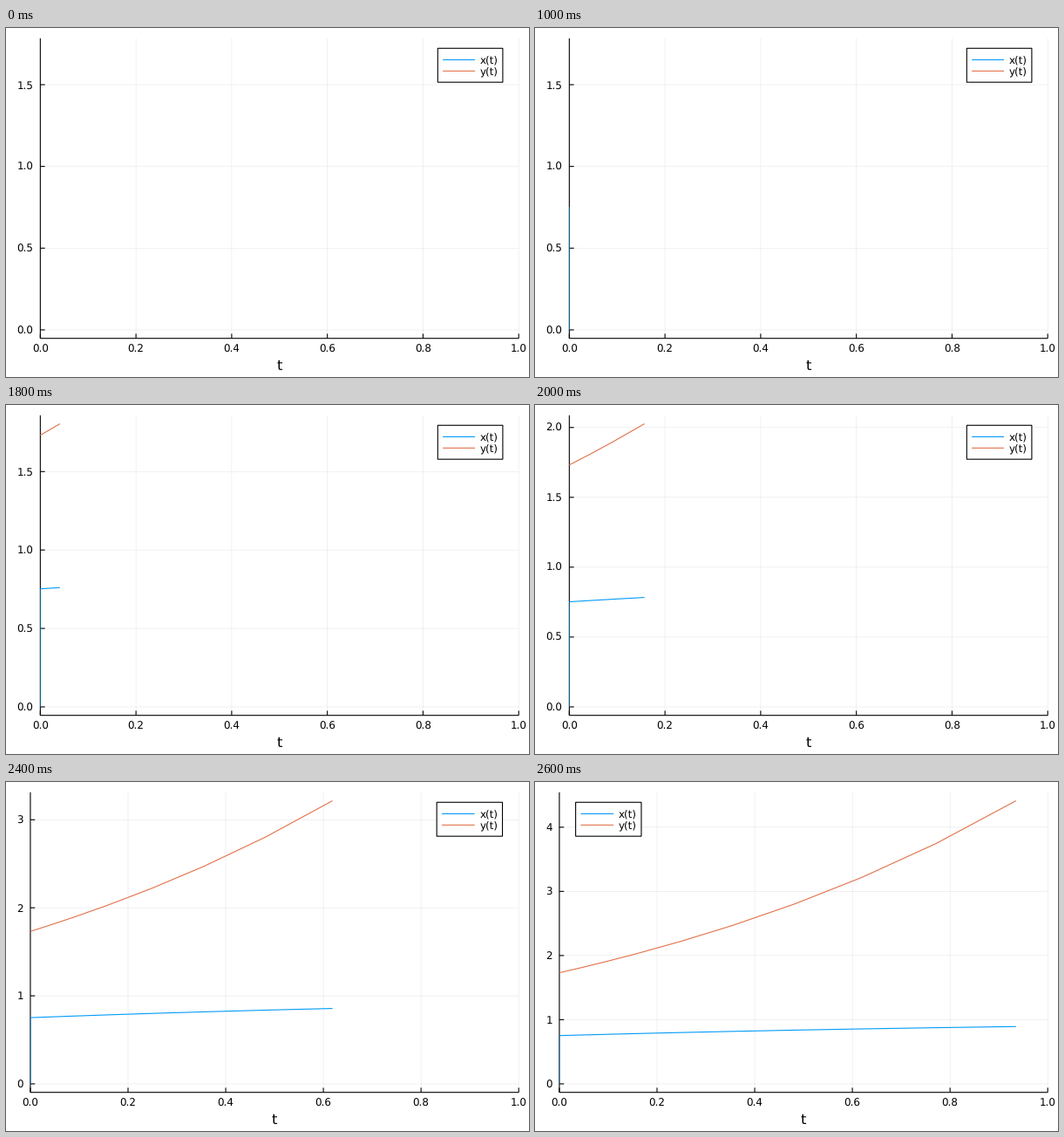
These frames come from a looping animation (600x400 px, 2700 ms). A matplotlib script:

```python
import numpy as np
import matplotlib.pyplot as plt
from matplotlib.animation import FuncAnimation
from matplotlib.patches import Rectangle

plt.rcParams["font.family"] = "DejaVu Sans"
plt.rcParams["text.hinting"] = "none"

FRAMES, INTERVAL = 27, 100
TOP, BOTTOM, RIGHT = 11.8, 355.7, 588.2   # plot area in pixels
PT = 0.72                                 # points per pixel at 100 dpi
SIZE, LABEL_SIZE = 11.95, 16.4
BLUE, ORANGE = "#009AFA", "#E36F47"
LINE = 1.1

# Stiff system: y' = y, eps x' = y (1 - x^2) - x, x(0) = 0, y(0) = sqrt(3)
Y0 = np.sqrt(3)
# slow times reached by the solver from frame 13 on
STEPS = np.array([0, 0.0002, 0.0007, 0.002, 0.014, 0.041, 0.0885, 0.157,
                  0.249, 0.3555, 0.481, 0.6186, 0.771, 0.935])
FIRST = 13

fig = plt.figure(figsize=(6, 4), dpi=100, facecolor="white")
ax = fig.add_axes([0, 0, 1, 1])


def slow_y(t):
    return Y0 * np.exp(t)


def slow_x(t):
    y = slow_y(t)
    return (np.sqrt(1 + 4 * y * y) - 1) / (2 * y)


def fast_x(tau):
    """Layer solution at t = 0, rising from 0 to the slow curve."""
    a = slow_x(0)
    b = -1 / Y0 - a
    e = np.exp(-Y0 * (a - b) * tau)
    return a * b * (1 - e) / (b - a * e)


def line(xs, ys, color="black", width=LINE, z=3, alpha=1):
    ax.plot(xs, ys, color=color, lw=width * PT, alpha=alpha, zorder=z,
            snap=False, solid_capstyle="butt", solid_joinstyle="round")


def text(x, y, s, ha="center", size=SIZE):
    """Text whose digits are centred on height y."""
    ax.text(x, y + 0.365 * size, s, ha=ha, va="baseline",
            fontsize=size * PT, color="black", zorder=8)


def draw_legend(left, on_left):
    w = RIGHT - left
    width = w / 15 + 38
    x = left + w / 30 if on_left else RIGHT - w / 30 - width
    y = TOP + (BOTTOM - TOP) / 30
    ax.add_patch(Rectangle((x, y), width, 38.9, fc="white", ec="black",
                           lw=LINE * PT, zorder=6, snap=False))
    for name, color, row in (("x(t)", BLUE, 36.4), ("y(t)", ORANGE, 49.3)):
        line([x + 5.8, x + 6.2 + w / 15], [row, row], color, z=7)
        text(x + w / 15 + 11.9, row, name, ha="left")


def draw(i):
    ax.cla()
    ax.set(xlim=(0, 600), ylim=(400, 0))
    ax.axis("off")

    ts = STEPS[:max(i - FIRST, 0) + 1]
    peak = slow_y(ts[-1])
    wide = peak < 3                       # half-unit labels need more room
    left = 39.35 if wide else 27.95
    step = 0.5 if wide else 1
    pad = 0.03 / 1.06 * (BOTTOM - TOP)

    def px(t):
        return left + t * (RIGHT - left)

    def py(v):
        return BOTTOM - pad - v * (BOTTOM - TOP - 2 * pad) / peak

    for k in range(6):
        x = px(k / 5)
        line([x, x], [TOP, BOTTOM], width=0.55, alpha=0.1, z=1)
        line([x, x], [BOTTOM, BOTTOM - 5.3])
        text(x, 367.3, f"{k / 5:.1f}")
    for v in np.arange(0, 1.03 * peak, step):
        y = py(v)
        line([left, RIGHT], [y, y], width=0.55, alpha=0.1, z=1)
        line([left, left + 5.3], [y, y])
        text(left - 8.2, y, f"{v:.1f}" if wide else f"{v:.0f}", ha="right")
    line([left, left], [TOP, BOTTOM])
    line([left, RIGHT], [BOTTOM, BOTTOM])
    text((left + RIGHT) / 2, 386, "t", size=LABEL_SIZE)

    # the jump lies on the axis, only its right half is inside the plot
    if i:
        rise = fast_x(1.7 * (min(i, 6) / 6) ** 2.5) if i < 10 else slow_x(0)
        x = left + LINE / 4
        line([x, x], [py(0), py(rise)], BLUE, width=LINE / 2, z=4)
    if len(ts) > 1:
        line(px(ts), py(slow_x(ts)), BLUE, z=4)
        line(px(ts), py(slow_y(ts)), ORANGE, z=4)

    draw_legend(left, on_left=i >= 25)
    return []


anim = FuncAnimation(fig, draw, frames=FRAMES, interval=INTERVAL,
                     init_func=lambda: draw(0), repeat=True, repeat_delay=0)
plt.show()
```
